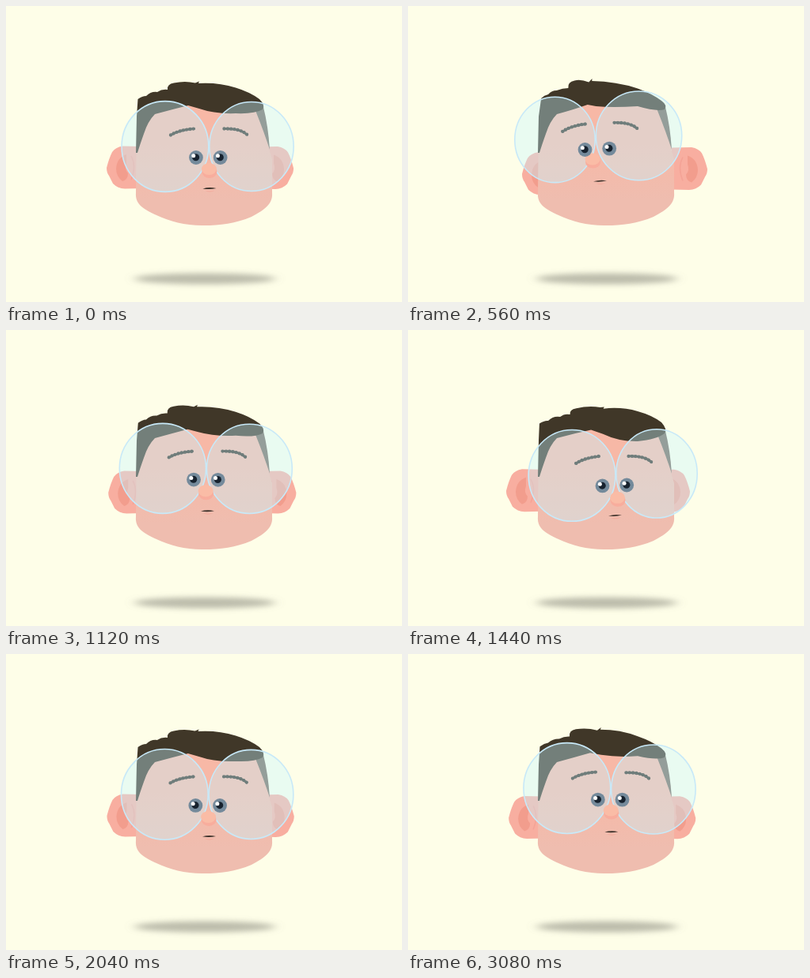
Recreate the animation shown at these times as an HTML page. Size 500 px wide and 375 px high, loop 3.12 s.

```html
<!DOCTYPE html>
<html lang="en">
<head>
<meta charset="utf-8">
<title>Looking around</title>
<style>
html, body { margin: 0; width: 100%; height: 100%; overflow: hidden; background: #fefee8; }
svg { display: block; width: 100%; height: 100%; }
</style>
</head>
<body>
<svg viewBox="0 0 500 375">
  <defs>
    <filter id="soft" x="-20%" y="-150%" width="140%" height="400%"><feGaussianBlur stdDeviation="6.500 3.600"/></filter>
    <linearGradient id="skin" gradientUnits="userSpaceOnUse" x1="0" y1="175" x2="0" y2="245">
      <stop offset="0" stop-color="#f7b8a6"/><stop offset="1" stop-color="#efbdaf"/>
    </linearGradient>
    <g id="ear">
      <path fill="#f8aea0" d="M172 178L147 177.500Q138 179 134 185Q130 193 127 205Q127 211 130 215L135 225Q141 231 150 231.500L172 231Z"/>
      <path fill="#f29d8d" d="M152 188Q140 192 139 206Q139 216 147 222Q154 220 154 212Q149 207 152 199Z"/>
      <path fill="none" stroke="#f4a396" stroke-width="1.500" d="M158 190Q165 203 158 220"/>
    </g>
    <g id="eye">
      <circle r="8.900" fill="#748a9b"/>
      <circle cx="-.3" cy="-.3" r="4.500" fill="#17222e"/>
      <circle cx="-3.200" cy="-2.200" r="2.500" fill="#fff"/>
    </g>
  </defs>
  <rect width="500" height="375" fill="#fefee8"/>
  <ellipse cx="251" cy="345.500" rx="89" ry="7" fill="#8c8c7e" fill-opacity=".57" filter="url(#soft)"/>
  <use id="earL" href="#ear"/>
  <use id="earR" href="#ear"/>
  <path fill="url(#skin)" d="M164.500 180L176 122H314L325 132Q331 156 333 184L336 194V237C337 250 328 257.500 310 267C290 275.500 270 278 250 278C228 278.500 207 273 190 265C172 257 163 250 164 237Z"/>
  <path id="fade" fill="#75695b"/>
  <path id="hair" fill="#403728"/>
  <g fill="none" stroke="#3a332a" stroke-linecap="round" stroke-linejoin="round">
    <g id="browL">
      <path stroke-width="3" d="M-14.500 3.500Q-4 -3 15 -4.500"/>
      <path stroke-width="4.300" stroke-dasharray="0 4.300" d="M-14.500 3.500Q-4 -3 15 -4.500"/>
    </g>
    <g id="browR">
      <path stroke-width="3" d="M-14.500 -3.500Q6 -4 14.500 4"/>
      <path stroke-width="4.300" stroke-dasharray="0 4.300" d="M-14.500 -3.500Q6 -4 14.500 4"/>
    </g>
  </g>
  <g fill="#c4f4ff" fill-opacity=".38" stroke="#c8e9f8" stroke-width="1.600">
    <ellipse id="lensL"/>
    <ellipse id="lensR"/>
  </g>
  <g id="nose">
    <ellipse cy="1" rx="9.500" ry="8" fill="#f8ad9d"/>
    <ellipse cx="-.5" cy="-2.500" rx="9.500" ry="7.500" fill="#fabca6"/>
  </g>
  <use id="eyeL" href="#eye"/>
  <use id="eyeR" href="#eye"/>
  <g id="mouth">
    <path fill="#f4a99b" d="M-6 2.500Q0 4.500 7 2.500Q0 6.500 -6 2.500Z"/>
    <path fill="#3a2f28" d="M-8.500 .4Q0 -2 8.500 0Q0 1.900 -8.500 .4Z"/>
  </g>
</svg>
<script>
const LOOP = 3120, CYCLE = 2030;

// gaze path: time, x, y of the left eye
const gaze = [
  [0, 240, 192], [70, 235, 190], [180, 226, 183.5], [310, 223.5, 182],
  [640, 223.5, 182], [760, 232, 177], [860, 244, 176.5], [930, 248, 177],
  [980, 247.5, 177.3], [1015, 245, 179.5], [1055, 239.5, 185], [1120, 237, 189.5],
  [1230, 237.5, 201], [1310, 240, 204], [1440, 245.5, 197.5], [1560, 247, 183],
  [1660, 247, 179], [1760, 247, 180], [1890, 245, 187], [CYCLE, 240, 192]
];

const $ = id => document.getElementById(id);

function slope(i, k) {
  const a = gaze[i - 1], b = gaze[i], c = gaze[i + 1];
  if (!a || !c) return k === 1 ? -0.055 : 0;
  const p = (b[k] - a[k]) / (b[0] - a[0]), q = (c[k] - b[k]) / (c[0] - b[0]);
  return p * q <= 0 ? 0 : 2 * p * q / (p + q);
}

function sample(t, k) {
  let i = 0;
  while (i < gaze.length - 2 && t >= gaze[i + 1][0]) i++;
  const a = gaze[i], b = gaze[i + 1], d = b[0] - a[0], s = (t - a[0]) / d;
  const s2 = s * s, s3 = s2 * s;
  return a[k] * (2 * s3 - 3 * s2 + 1) + b[k] * (3 * s2 - 2 * s3)
    + d * (slope(i, k) * (s3 - 2 * s2 + s) + slope(i + 1, k) * (s3 - s2));
}

function move(id, x, y, extra = '') {
  $(id).setAttribute('transform', `translate(${x.toFixed(2)} ${y.toFixed(2)}) ${extra}`);
}

function ellipse(id, cx, cy, rx, ry) {
  const e = $(id);
  Object.entries({ cx, cy, rx, ry }).forEach(([k, v]) => e.setAttribute(k, v.toFixed(2)));
}

function drawHair(u, v) {
  // a point that follows the turn by fu and the nod by fv
  const p = (x, y, fu = 0, fv = 0) => `${(x + u * fu).toFixed(2)} ${(y + v * fv).toFixed(2)} `;
  $('hair').setAttribute('d',
    'M164 186L' + p(165, 140) + 'L' + p(166.5, 118, -0.1, 0.1)
    + 'Q' + p(172, 114, 0, 0.1) + p(177, 114, 0, 0.2)
    + 'Q' + p(183, 108, 0.1, 0.1) + p(191, 109, 0.2, 0.2)
    + 'Q' + p(197, 105, 0.1, 0.1) + p(204, 106, 0.1, 0.2)
    + 'Q' + p(203, 99, 0.1, 0.3) + p(212, 97.5, 0.1, 0.3)
    + 'Q' + p(226, 94.5, 0.5, 0.2) + p(239, 97.5, 0.65, 0.1)
    + 'L' + p(244, 95.5, 0.7, 0.35) + 'L' + p(243, 98, 0.65, 0.3)
    + 'Q' + p(268, 96.5, 0.3, 0.1) + p(290, 103.5, 0, -0.1)
    + 'Q' + p(308, 109, 0, -0.2) + p(320, 118, 0, -0.2)
    + 'Q' + p(328, 126) + p(324, 131)
    + 'Q' + p(314, 137, 0, 0.3) + p(290, 136, 0, 0.9)
    + 'Q' + p(264, 137, 0.4, 0.8) + p(244, 130, 0.4, 0.3)
    + 'L' + p(230, 126, 0.2, 0.1) + 'Q' + p(210, 131) + p(188, 137)
    + 'Q' + p(179, 146) + p(174, 162) + 'Q169 176 166 186Z');
  $('fade').setAttribute('d', 'M314 130L325 128Q331 152 333 182Q326 160 314 130Z');
}

function draw(t) {
  const at = t % CYCLE;
  const u = sample(at, 1) - 240, v = sample(at, 2) - 192;
  // curve through 0 at centre, l at far left, r at right
  const bend = (l, r) => l * u * (u - 5.5) / 363 + r * u * (u + 16.5) / 121;

  move('earL', bend(17, -3), -0.32 * v + bend(4.5, 0.5));
  move('earR', 490 + bend(15, -7), 0.5 - 0.3 * v + bend(-2, 0.5), 'scale(-1 1)');
  drawHair(u, v);
  move('browL', 222.5 + bend(-13, 4), 160 + 0.8 * v + bend(2.7, 0.6), `rotate(${bend(-3, -2)})`);
  move('browR', 290 + bend(-15, 3), 159 + 0.7 * v + bend(-0.7, 0.6));
  ellipse('lensL', 201 + bend(-15.5, 6), 178 + 1.07 * v + bend(2.1, 0.6),
    54.9 + bend(-4.2, 0), 57.4 + bend(-3.2, 0.5));
  ellipse('lensR', 310 + bend(-18.5, 4), 178 + 0.87 * v + bend(-4.9, -0.8),
    53.2 + bend(1, -2), 56.5 + bend(-0.1, -0.4));
  move('nose', 257 + bend(-23.5, 8), 209 + 1.15 * v + bend(-1, -0.4));
  move('eyeL', 240 + u, 192 + v);
  move('eyeR', 270.7 + u, 192 + v + bend(-1.4, -0.9));
  move('mouth', 257 + bend(-14.5, 4.5), 231 + 0.78 * v + bend(-1.6, -0.4), `rotate(${bend(-2, -1.5)})`);
}

const start = performance.now();
function tick() {
  draw((performance.now() - start) % LOOP);
  requestAnimationFrame(tick);
}
tick();
</script>
</body>
</html>
```
